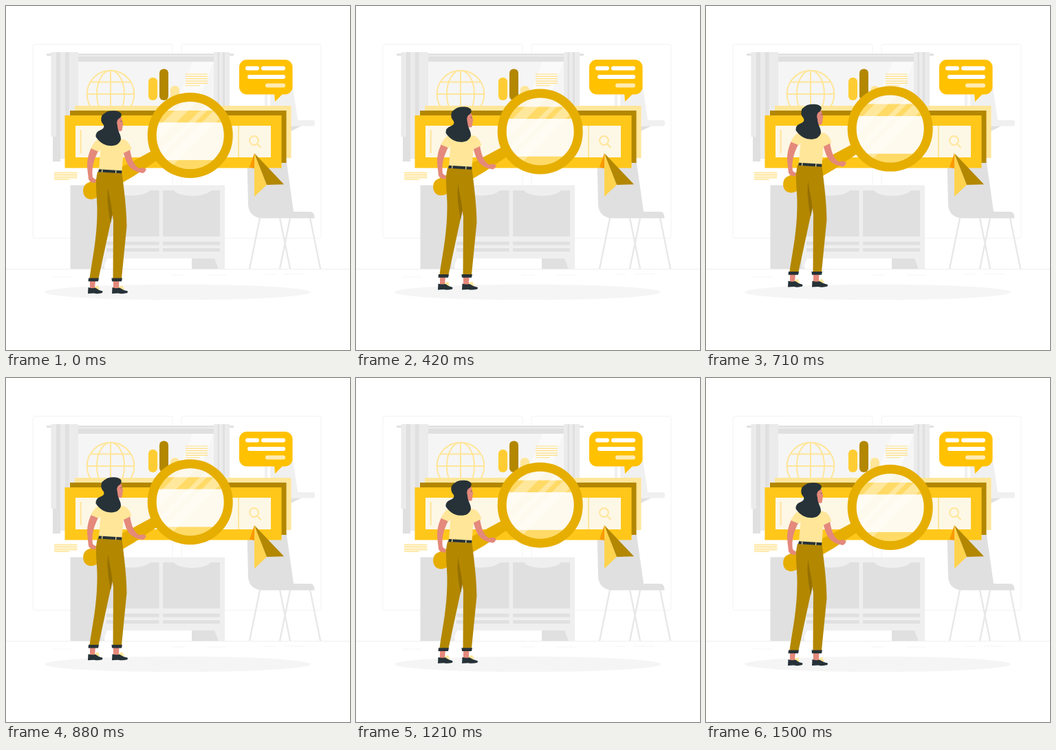
Animation, 500 px wide and 500 px high, one loop 1.54 s. Source, as an HTML page:

```html
<!DOCTYPE html>
<html lang="en">
<head>
<meta charset="utf-8">
<title>Search</title>
<style>
html, body { margin: 0; width: 100%; height: 100%; overflow: hidden; background: #fff; }
svg { display: block; width: 100vw; height: 100vh; }
.amber { fill: #ffc100; }
.dark { fill: #b38700; }
.ring { fill: #e6ae00; }
.light { fill: #ffe699; }
.mid { fill: #ffcd33; }
.skin { fill: #e4897b; }
.ink { fill: #263238; }
.g1 { fill: #f5f5f5; }
.g2 { fill: #ebebeb; }
.g3 { fill: #e0e0e0; }
.line { fill: none; stroke: #ffe699; stroke-width: 2; }
</style>
</head>
<body>
<svg viewBox="0 0 500 500">
  <defs>
    <clipPath id="glass"><circle cx="267.7" cy="188" r="50"/></clipPath>
  </defs>

  <!-- room -->
  <g fill="none" stroke="#f3f3f3">
    <rect x="39" y="55.5" width="203" height="282" rx="3"/>
    <rect x="255" y="55.5" width="203" height="282" rx="3"/>
    <path stroke="#ebebeb" stroke-width=".8" d="M0 382.5H500"/>
    <path stroke-width=".8" d="M67 394H96M240 391H260M292 391H320M376 390H392M404 389.5H434"/>
  </g>
  <ellipse class="g1" cx="249.5" cy="416" rx="193.5" ry="11.3"/>

  <!-- window -->
  <path class="g3" d="M68 73H79V226H68Z"/>
  <path class="g2" d="M79 73H105V222H79Z"/>
  <path class="g1" d="M105 73H303V160H105Z"/>
  <path class="g3" d="M105 73H303V81H105Z"/>
  <path fill="#fafafa" d="M271 81H302L277 145H246Z"/>
  <rect class="g3" x="59" y="69.3" width="272" height="3" rx="1"/>
  <path class="g2" d="M65.500 67H105V190H65.500ZM302 67H325V152H302Z"/>
  <path class="g3" d="M73 67H79V190H73ZM86 67H91.500V190H86ZM307.500 67H310V152H307.500ZM315 67H318V152H315Z"/>

  <!-- cabinet -->
  <path class="g3" d="M93.500 260.500H143V382H93.500ZM270 366H304L309 382H270Z"/>
  <path fill="#efefef" d="M139 260.500H318V382H309L303 367H147L141 382H139Z"/>
  <path class="g3" d="M146 268H155C162 278 201 278 209 268H222.500V335H146ZM228 268H244C251 278.500 290 278.500 298 268H311V335H228Z"/>
  <path class="g3" d="M146 342.500H222.500V347.500H146ZM228 342.500H311V347.500H228ZM146 352H222.500V357H146ZM228 352H311V357H228Z"/>

  <!-- chair -->
  <path fill="#f0f0f0" d="M376 120H380V182H376ZM384 128L417 119 424 166H446Q449 166 449 170 449 174.500 446 174.500H384Z"/>
  <path class="g3" d="M414 174.500H429L414 182Z"/>
  <path fill="none" stroke="#e8e8e8" stroke-width="2.400" d="M369 308L354 382M398 308L413 382M413 308L398 382M442 308L457 382"/>
  <path class="g3" d="M350.500 225H407.500L418 299H442Q448.500 299 448.500 308.500H372Q354 307 352 290Z"/>

  <!-- globe, chart, notes -->
  <g class="line">
    <circle cx="152" cy="128" r="34.300"/>
    <ellipse cx="152" cy="128" rx="20" ry="34.300"/>
    <path d="M152 94V160M118 128H186M123 110.500H181"/>
  </g>
  <rect class="mid" x="207" y="104" width="13" height="33" rx="6"/>
  <rect class="dark" x="223" y="91.500" width="13" height="45.500" rx="6"/>
  <rect class="light" x="239" y="116" width="13" height="40" rx="6"/>
  <g id="notes" stroke="#ffdf80" stroke-width="1.200"></g>

  <!-- search bar -->
  <path class="light" d="M100 145H414.500V221H100Z"/>
  <path class="dark" d="M93 152H407.500V228H93Z"/>
  <path fill="#ffc71a" d="M85.500 159H400.500V235.500H85.500Z"/>
  <path fill="#fdf7e6" d="M101 174H385V220H101Z"/>
  <path class="line" d="M108.700 180V214M338 174V220"/>
  <g class="line" stroke-width="2.300">
    <circle cx="360.500" cy="195.500" r="6.400"/>
    <path d="M365.200 200.500L370 205.500" stroke-linecap="round"/>
  </g>

  <!-- speech bubble -->
  <rect class="amber" x="339" y="78" width="77.500" height="50.500" rx="11"/>
  <path class="amber" d="M390 127L391 139 403 127Z"/>
  <g fill="#fff">
    <rect x="348" y="87.500" width="20" height="6" rx="3"/>
    <rect x="371" y="87.500" width="35" height="6" rx="3"/>
    <rect x="351" y="100" width="55" height="6" rx="3"/>
    <rect x="377" y="112.500" width="29" height="6" rx="3" fill="#ffecb3"/>
  </g>

  <!-- pointer -->
  <path fill="#f99a00" d="M361 214L354 234.500 361 236Z"/>
  <path fill="#ffd34d" d="M361 214L379 260 361 277Z"/>
  <path class="dark" d="M361 214L404 259.300 379 260Z"/>

  <!-- floating figure -->
  <g id="float">
    <path class="ring" d="M215 209L178 229 117 258C110 263 111 275 117 279 122 282 127 281 131 279L186 247 223 222Z"/>
    <g clip-path="url(#glass)">
      <path fill="#fbf5e3" d="M215 135H320V240H215Z"/>
      <path fill="#ffda66" d="M215 152H320V169.500H215ZM215 224H320V240H215Z"/>
      <path fill="#fefaee" d="M215 169.500H320V224H215Z"/>
      <path fill="#fff" opacity=".35" d="M280 137L212 205V185L260 137ZM307 137L207 237H197L297 137ZM337 137L237 237H217L317 137Z"/>
    </g>
    <circle cx="267.700" cy="188" r="55.500" fill="none" stroke="#e6ae00" stroke-width="13"/>

    <!-- legs -->
    <path class="skin" d="M122 399H130L129 411H122ZM156 399H164.500L164 411H156Z"/>
    <path class="light" d="M129 408L134 406 136 412H129ZM164 408L169 406 172 412H164Z"/>
    <g class="ink">
      <path id="shoe" d="M119.500 409Q124 411 130 409.500 134 413 140.500 414.500L140 417Q133 419 128 417.500L119 418Z"/>
      <path d="M154.500 409Q159 411 165 409.500 170 413 177 414.500L176.500 417Q169 419 163 417.500L154 418Z"/>
    </g>
    <path class="dark" d="M133 241L168.500 242C171 262 175.500 296 175.500 320L168 396H155.500L156 312 154.500 303 134.500 396H121.500C126 364 133 335 132.500 292 132 272 129 256 133 241Z"/>
    <path fill="#967000" d="M148.500 264C150 279 154 289 154.500 304L152 316C149 297 146 281 148.500 264Z"/>
    <path class="ink" d="M120 395.500H135L134 400.300H119.500ZM153.500 395.500H169L168 400.300H154Z"/>

    <!-- arms and body -->
    <path class="skin" d="M124.500 205C119 216 117 227 118.500 239L120 252Q122 257 130 257L131 253 126 249C124 234 128 223 135 209Z"/>
    <path class="skin" d="M170 210C173 223 176 231 182 236 187 240 193 242 199 243L202 241 204 237 199 235 193 236C185 231 182 220 180 208Z"/>
    <path class="light" d="M132 195C128 198 125 203 123.500 207L135 212 137.500 208 135 238 168.500 240 170.500 214 182.500 208C180 200 176 195 171 194L150 191Z"/>
    <path class="ink" d="M135 237.300L168.500 239.300 168 243.200 134 241.300Z"/>
    <path stroke="#ffe699" stroke-width="1.200" d="M140 237.500L139.500 241.700M160 238.700L159.500 243"/>

    <!-- head -->
    <path class="skin" d="M159 164L167.500 161 169 167 170.500 172 169.300 173.500 169.500 176 168.500 181Q166 183 162 181L163 194 153 196Z"/>
    <path class="ink" d="M139.500 159Q144 155 147 153.500C155 151 165 152 167.500 156.500Q169 161 163 164.500 160 168 162 174C162 182 167.500 187 167 194 165 201 158 204 151 203 142 203 134 196 130.500 190Q130 183 137 180.500 144 178 142 173 136 167 139.500 159Z"/>
    <path class="ink" d="M166 167.500L168.500 167 168.500 168Z"/>
  </g>
</svg>
<script>
const LOOP = 1540, FPS = 24, HALF = 750, RISE = 10, LEAD = 20;
const notes = document.getElementById('notes');
const float = document.getElementById('float');

// Lines of tiny copy; the last one is shorter
function addNote(x, y, width, gap, count) {
  let d = '';
  for (let i = 0; i < count; i++) {
    d += `M${x} ${y + i * gap}h${i < count - 1 ? width : width * 0.65}`;
  }
  const path = document.createElementNS('http://www.w3.org/2000/svg', 'path');
  path.setAttribute('d', d);
  notes.append(path);
}
addNote(261, 99, 32, 3.35, 6);
addNote(70, 242.2, 33.5, 2.5, 5);

// Steady rise and fall, stepped at 24 per second
function lift(ms) {
  const step = Math.floor((ms % LOOP + 5) * FPS / 1000);
  const phase = (step * 1000 / FPS + LEAD) % (2 * HALF);
  return RISE * (1 - Math.abs(phase - HALF) / HALF);
}

const rest = lift(0);
const start = performance.now();
function draw(now) {
  const y = rest - lift(Math.max(0, now - start));
  float.setAttribute('transform', `translate(0 ${y.toFixed(3)})`);
  requestAnimationFrame(draw);
}
draw(start);
</script>
</body>
</html>
```
